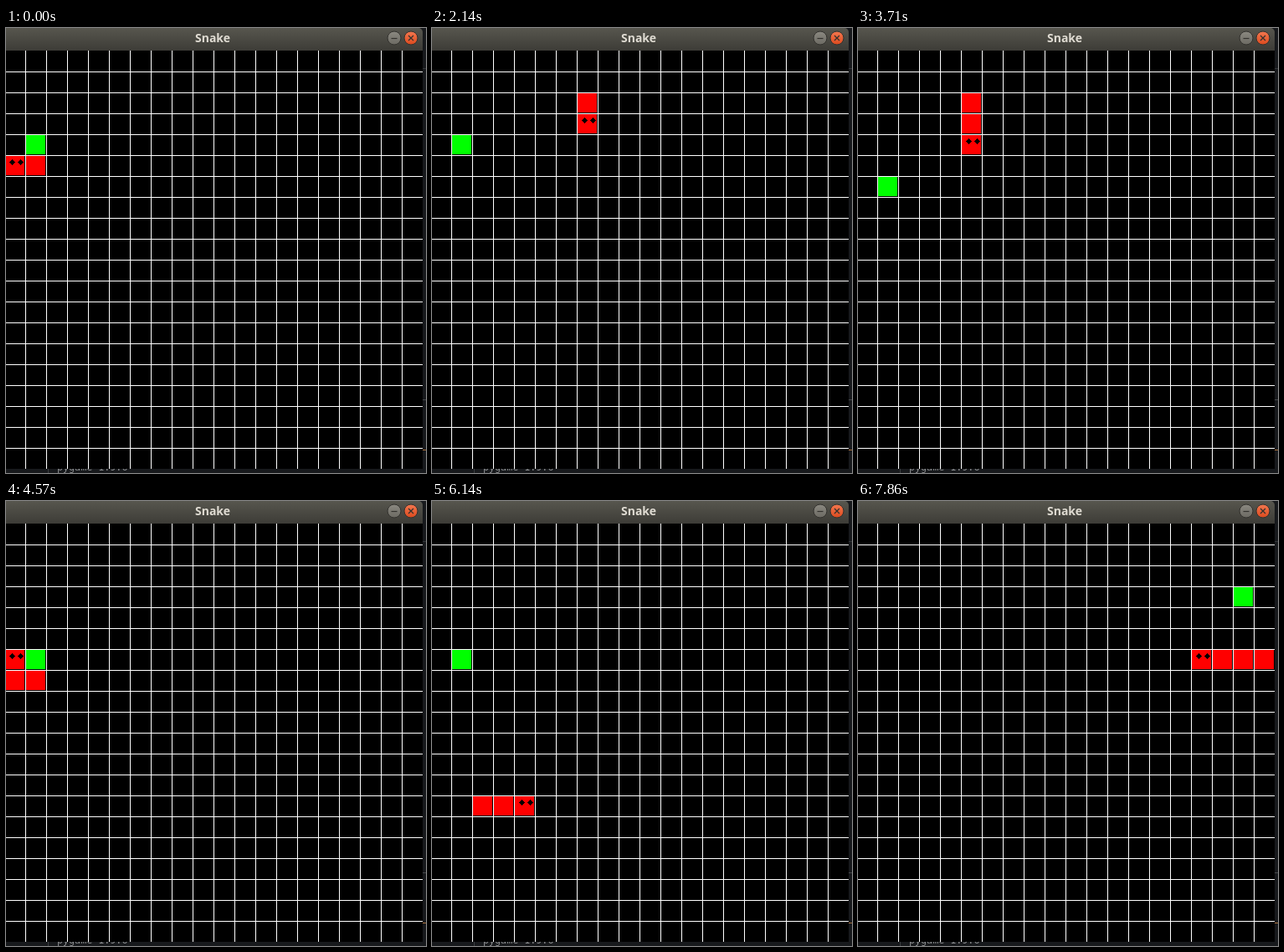
An HTML page with a canvas for the animation above (8000 ms loop, 502 px wide and 532 px high).

```html
<!DOCTYPE html>
<html lang="en">
<head>
<meta charset="utf-8">
<title>Snake</title>
<style>
  html, body { margin: 0; width: 100%; height: 100%; overflow: hidden; background: #17191c; }
  canvas { display: block; }
</style>
</head>
<body>
<canvas id="stage" width="502" height="532"></canvas>
<script>
const ctx = document.getElementById('stage').getContext('2d');

const LOOP = 8000, FRAMES = 56, CELL = 25, ROWS = 20;
const LEFT = -2, TOP = 27, SIZE = CELL * ROWS;
const MOVES_PER_FRAME = 1.396, MOVE_PHASE = 0.68;

const ROUTE = 'L3 U5 L10 D4 L6 U2 R4 D5 L5 U3 R2 D9 R3 U7 L9';
const STEP = { L: [-1, 0], R: [1, 0], U: [0, -1], D: [0, 1] };
const MEALS = [
  { eaten: 28, at: [1, 4] },
  { eaten: 72, at: [1, 6] },
  { eaten: Infinity, at: [18, 3] }
];

// Head positions, one per move; the board wraps at its edges.
const trail = [[1, 5], [0, 5]];
for (const run of ROUTE.split(' ')) {
  const [dx, dy] = STEP[run[0]];
  for (let i = 0; i < +run.slice(1); i++) {
    const [x, y] = trail[trail.length - 1];
    trail.push([(x + dx + ROWS) % ROWS, (y + dy + ROWS) % ROWS]);
  }
}

function rect(color, x, y, w, h) {
  ctx.fillStyle = color;
  ctx.fillRect(x, y, w, h);
}

function text(value, font, color, x, y, align) {
  ctx.font = font;
  ctx.fillStyle = color;
  ctx.textAlign = align;
  ctx.fillText(value, x, y);
}

function button(x, fill, glyph) {
  const shade = ctx.createLinearGradient(0, 4, 0, 20);
  fill.forEach((color, i) => shade.addColorStop(i, color));
  ctx.beginPath();
  ctx.arc(x, 12, 8, 0, Math.PI * 2);
  ctx.fillStyle = shade;
  ctx.fill();
  ctx.lineWidth = 1;
  ctx.strokeStyle = '#33322e';
  ctx.stroke();
  ctx.lineWidth = 1.2;
  ctx.stroke(new Path2D(glyph));
}

function drawDesktop() {
  rect('#17191c', 0, 0, 502, 532);
  rect('#34373a', 498, 48, 4, 1);
  rect('#45484b', 498, 444, 4, 1);
  rect('#a8703c', 498, 504, 4, 1);
  rect('#3a3d40', 50, 527, 1, 5);
  text('pygame 1.9.6', '11.7px "DejaVu Sans Mono", monospace', '#8b8d8f', 61, 529, 'left');
}

function drawTitleBar() {
  const shade = ctx.createLinearGradient(0, 0, 0, 27);
  shade.addColorStop(0, '#57564e');
  shade.addColorStop(1, '#3d3c37');
  ctx.fillStyle = shade;
  ctx.beginPath();
  ctx.roundRect(-10, 0, 508, 27, [0, 5, 0, 0]);
  ctx.fill();
  text('Snake', 'bold 14px "Open Sans", sans-serif', '#dfdbd2', 247, 17, 'center');
  button(464, ['#8b8981', '#6c6a63'], 'M460.5 12.5h7');
  button(484, ['#f37850', '#dc4a1e'], 'M481 9l6 6m0 -6l-6 6');
}

function drawCube([col, row], color) {
  rect(color, LEFT + col * CELL + 1, TOP + row * CELL + 1, CELL - 2, CELL - 2);
}

function drawEyes([col, row]) {
  const y = TOP + row * CELL + 8;
  for (const offset of [9, 19]) {
    const x = LEFT + col * CELL + offset;
    for (let d = -3; d <= 3; d++) {
      const half = 3 - Math.abs(d);
      rect('#000', x - half, y + d, half * 2 + 1, 1);
    }
  }
}

function drawBoard(moves) {
  rect('#000', LEFT, TOP, SIZE, SIZE);
  const meal = MEALS.findIndex(m => moves < m.eaten);
  const head = moves + 1;
  for (let i = 0; i < 2 + meal; i++) drawCube(trail[head - i], '#f00');
  drawEyes(trail[head]);
  drawCube(MEALS[meal].at, '#0f0');
  for (let i = 1; i < ROWS; i++) {
    rect('#fff', LEFT + i * CELL, TOP, 1, SIZE);
    rect('#fff', LEFT, TOP + i * CELL, SIZE, 1);
  }
}

function draw(now) {
  // Frame starts fall on multiples of 10 ms.
  const time = now % LOOP;
  const frame = Math.min(FRAMES - 1, Math.floor((time + 5) * FRAMES / LOOP));
  drawDesktop();
  drawTitleBar();
  drawBoard(Math.floor(frame * MOVES_PER_FRAME + MOVE_PHASE));
}

const start = performance.now();
function tick() {
  draw(performance.now() - start);
  requestAnimationFrame(tick);
}
tick();
</script>
</body>
</html>
```
